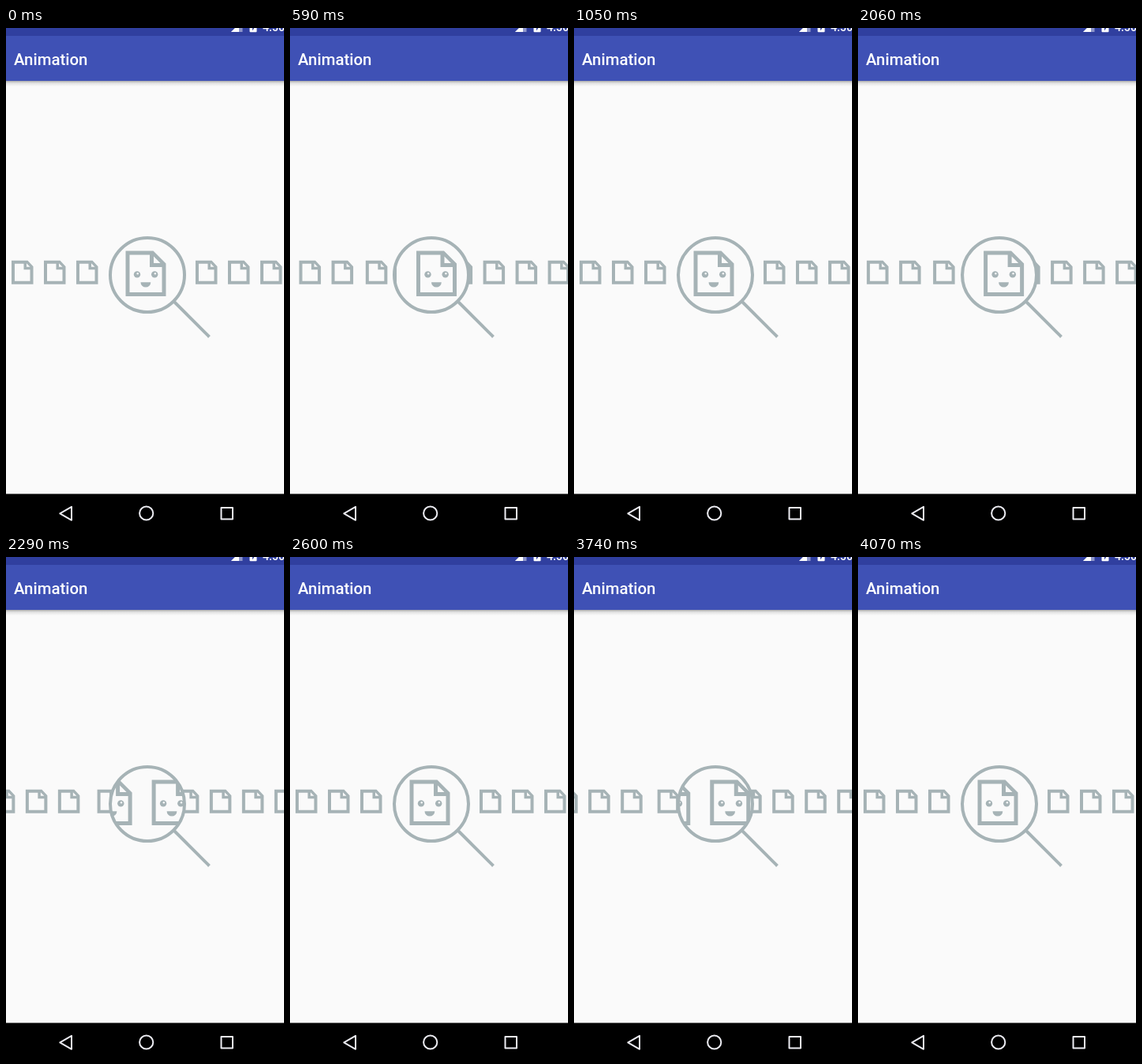
Write an HTML page that moves like this. It is 352 px wide and 635 px high and loops after 4450 ms.

```html
<!DOCTYPE html>
<html lang="en">
<head>
<meta charset="utf-8">
<title>Animation</title>
<style>
html, body { margin: 0; width: 100%; height: 100%; overflow: hidden; background: #fafafa; }
svg { display: block; width: 100%; height: 100%; }
text { font-family: Roboto, sans-serif; font-weight: 500; fill: #fff; }
</style>
</head>
<body>
<svg viewBox="0 0 352 635">
  <defs>
    <linearGradient id="shade" x1="0" y1="0" x2="0" y2="1">
      <stop offset="0" stop-opacity=".32"/>
      <stop offset=".4" stop-opacity=".1"/>
      <stop offset="1" stop-opacity="0"/>
    </linearGradient>
    <clipPath id="lens"><circle cx="179" cy="313" r="47"/></clipPath>
    <path id="small" fill-rule="evenodd" d="M0 0H20.5L27.5 7.5V30H0Z M4 4V26H23.5V11.5H15.5V4Z M19 3.5V8H23.5Z"/>
    <g id="big">
      <path fill-rule="evenodd" d="M0 0H35L51 16V57.5H0Z M5 5V52.5H46V20.5H30.5V5Z M35.5 7V15.5H44Z"/>
      <circle cx="14.5" cy="30" r="4.2"/>
      <circle cx="36.7" cy="30" r="4.2"/>
      <path d="M19 39.8H31.8A6.4 6.4 0 0 1 19 39.8Z"/>
      <g fill="#fafafa">
        <circle cx="15.2" cy="28.8" r="1.2"/>
        <circle cx="37.4" cy="28.8" r="1.2"/>
      </g>
    </g>
  </defs>

  <rect width="352" height="635" fill="#fafafa"/>

  <!-- app bar -->
  <rect y="67" width="352" height="7" fill="url(#shade)"/>
  <rect width="352" height="67" fill="#3f51b5"/>
  <rect width="352" height="10" fill="#303f9f"/>
  <path d="M285 5L299.5 -9.5V5Z" fill="#fff" opacity=".45"/>
  <path d="M285 5L295 -5V5Z" fill="#fff"/>
  <rect x="308.5" y="-9" width="9" height="14.3" rx="1" fill="#fff"/>
  <path d="M314.8 -1L312 3.6V0H310.8L313 -4V-1Z" fill="#303f9f"/>
  <text x="325" y="4" font-size="14.2">4:50</text>
  <text x="10" y="47" font-size="20.4">Animation</text>

  <!-- row of files under the magnifier -->
  <g fill="#a6b3b6">
    <g id="row"></g>
    <circle cx="179" cy="313" r="47" fill="#fafafa"/>
    <g id="inside" clip-path="url(#lens)"></g>
  </g>
  <g fill="none" stroke="#a6b3b6" stroke-width="4">
    <circle cx="179" cy="313" r="47"/>
    <path d="M212.5 346.5L257.5 391.5"/>
  </g>

  <!-- navigation bar -->
  <rect y="590.5" width="352" height="45" fill="#000"/>
  <g fill="none" stroke="#ececf2" stroke-width="2" stroke-linejoin="round">
    <path d="M68.3 615.3L83 606.8V623.8Z"/>
    <circle cx="177.7" cy="615" r="8.6"/>
    <rect x="272.5" y="608" width="14.5" height="14.5"/>
  </g>
</svg>
<script>
const LOOP = 4450, STEP = 77, POSES = 7;
const GAP = 41, BIG_GAP = 76, ENTRY = 61;

// Each slide: start and end in ms, first phase, phase added per step
const slides = [
  { from: 510, to: 1050, phase: .102, add: .115 },
  { from: 2060, to: 2600, phase: .205, add: .127 },
  { from: 3510, to: 4070, phase: .12, add: .115 }
];

function place(parent, shape, x, y, travel) {
  const el = document.createElementNS("http://www.w3.org/2000/svg", "use");
  el.setAttribute("href", "#" + shape);
  document.getElementById(parent).append(el);
  return { el, x, y, travel };
}

const files = [
  ...[-34, 7, 48].map(x => place("row", "small", x, 294.8, GAP)),
  place("row", "small", 89, 294.8, ENTRY),
  ...[199, 240, 281, 322].map(x => place("row", "small", x, 294.8, GAP)),
  ...[-1, 0].map(i => place("inside", "big", 151.5 + i * BIG_GAP, 282.4, BIG_GAP))
];

const ease = t => (1 - Math.cos(Math.PI * Math.min(1, t))) / 2;

function progress(t) {
  const s = slides.find(s => t >= s.from && t < s.to);
  if (!s) return 0;
  const pose = Math.max(0, POSES + Math.floor((t - s.to) / STEP));
  return ease(s.phase + pose * s.add);
}

function draw(t) {
  const p = progress(t);
  for (const f of files) {
    f.el.setAttribute("transform", `translate(${f.x + f.travel * p} ${f.y})`);
  }
}

let start;
function tick(now) {
  start ??= now;
  draw((now - start) % LOOP);
  requestAnimationFrame(tick);
}
draw(0);
requestAnimationFrame(tick);
</script>
</body>
</html>
```
